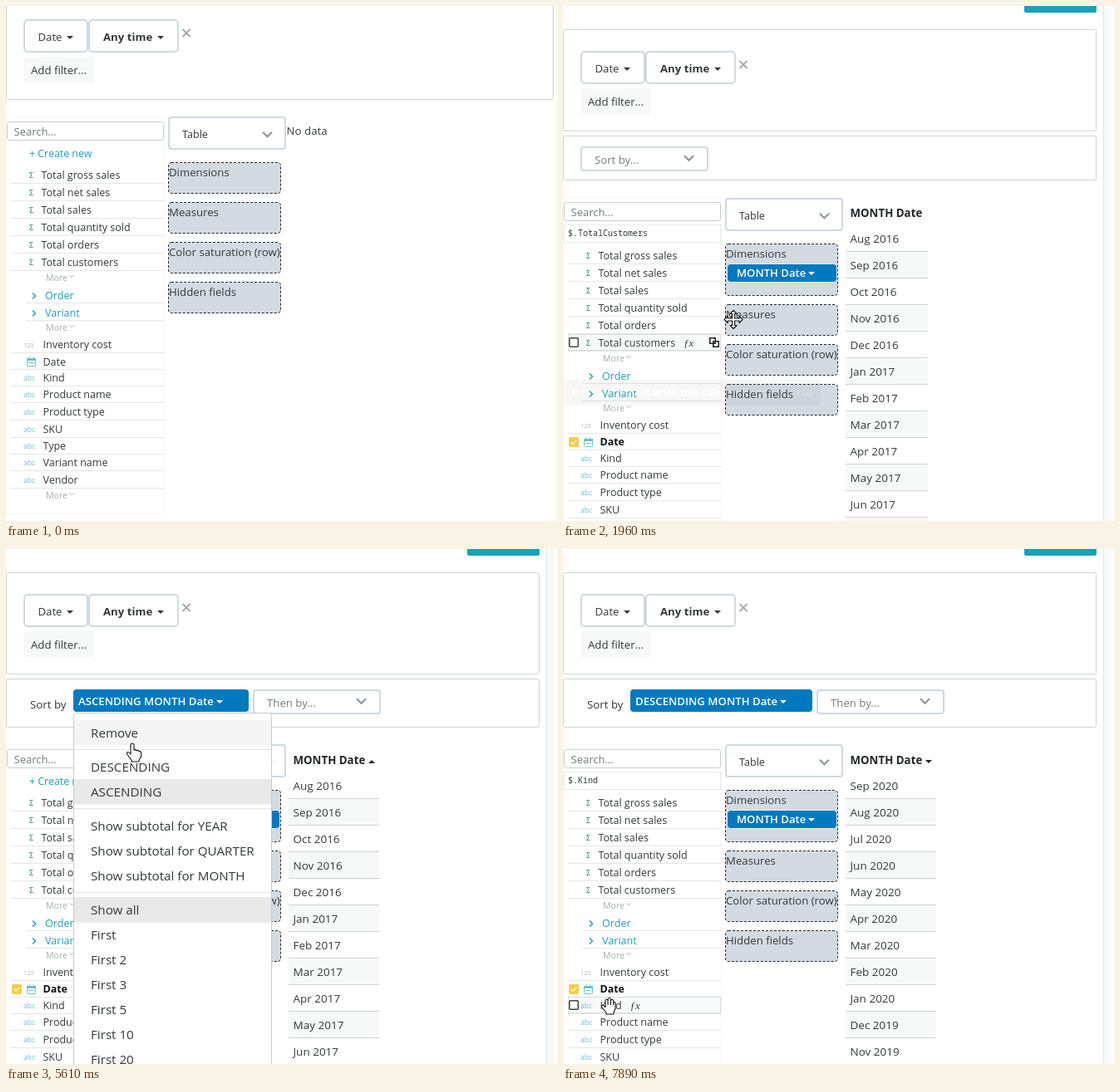
These frames come from a looping animation (663x620 px, 8 s). An HTML page:

```html
<!DOCTYPE html>
<html lang="en">
<head>
<meta charset="utf-8">
<title>Report builder</title>
<style>
html, body { margin: 0; width: 100%; height: 100%; overflow: hidden; background: #fff; }
svg { display: block; font-family: "Open Sans", "Noto Sans", sans-serif; }
.raised { filter: drop-shadow(0 2px 3px rgba(0, 0, 0, .3)); }
</style>
</head>
<body>
<svg id="stage" width="663" height="620" viewBox="0 0 663 620"></svg>
<script>
const LOOP = 8000;
const INK = '#35393d', TEAL = '#1c9fb5', BLUE = '#0079bf', EDGE = '#ced9e1', LINE = '#d0d2d4';
const MONTHS = 'Jan Feb Mar Apr May Jun Jul Aug Sep Oct Nov Dec'.split(' ');
const MEASURES = ['gross sales', 'net sales', 'sales', 'quantity sold', 'orders', 'customers'].map(s => 'Total ' + s);
const FIELDS = [['Inventory cost', 407], ['Date', 428], ['Kind', 447], ['Product name', 467], ['Product type', 488],
  ['SKU', 509], ['Type', 529], ['Variant name', 549], ['Vendor', 570]];
const MENU = [['Remove', 222], ['DESCENDING', 263], ['ASCENDING', 293], ['Show subtotal for YEAR', 334],
  ['Show subtotal for QUARTER', 364], ['Show subtotal for MONTH', 394], ['Show all', 435],
  ...['', ' 2', ' 3', ' 5', ' 10', ' 20'].map((n, i) => ['First' + n, 465 + 30 * i])];

// Moments when the interface changes state
const ADD = 970, LOAD = 1500, OPEN = 2900, SORT = 4270, SORTED = 4540, BLUR = 5000,
  MENU_ON = 5270, MENU_OFF = 7260, RESORTED = 7600;
const HOVER = [[0, ''], [440, 'Date'], [1880, 'Total customers'], [2080, ''], [7260, 'Product name'], [7640, 'Kind']];

// time, x, y, cursor shape from then on
const TRACK = [
  [40, 505, 604, 'arrow'], [400, 110, 440, 'grab'], [500, 42, 421, 'grab'], [640, 42, 421, 'grab'],
  [660, 42, 422, 'grab'], [810, 42, 422, 'grab'], [820, 45, 424, 'grab'], [1840, 45, 424, 'grab'],
  [1960, 205, 378, 'move'], [2060, 215, 330, 'arrow'], [2380, 120, 104, 'arrow'], [2630, 130, 146, 'arrow'],
  [2820, 150, 182, 'arrow'], [2960, 150, 182, 'arrow'], [3270, 85, 208, 'arrow'], [3530, 85, 208, 'arrow'],
  [3610, 74, 198, 'arrow'], [3760, 74, 202, 'arrow'], [4080, 77, 212, 'arrow'], [4530, 77, 212, 'arrow'],
  [4760, 126, 188, 'point'], [4900, 126, 188, 'point'], [5090, 150, 189, 'point'], [5270, 150, 189, 'point'],
  [5590, 152, 234, 'point'], [5700, 152, 234, 'point'], [6050, 164, 256, 'point'], [6200, 164, 256, 'point'],
  [6980, 80, 538, 'grab'], [7200, 57, 565, 'grab'], [7540, 57, 565, 'grab'], [7750, 55, 550, 'grab']];

const SHAPES = {
  arrow: 'M0 0V16.5L4 12.8 6.6 18.8 9.2 17.6 6.6 11.8H12Z',
  point: 'M-2 2a2 2 0 0 1 4 0V8q2-1 3 .8q2-1 3 .8q2.6-.6 2.6 2V16L8 20v2H-1V20L-6 13.5q-1.5-2.5 .2-3Q-4.5 10-2 13Z',
  grab: 'M-4-1V-6q0-2 1.5-2t1.5 2V-7.5q0-2 1.7-2t1.7 2V-6q.3-1.7 1.6-1.7t1.6 2V-4q2.2-1.5 2.4 1V3L6 8V10H-3V8L-8 2q-1.5-2.5 .5-2.8Q-6.5-1-4 1.5ZM-1-6V-1M2.4-6V-1M5.6-5V-1',
  move: 'M0-11l4 4H1.5V-1.5H7V-4l4 4-4 4V1.5H1.5V7H4L0 11-4 7H-1.5V1.5H-7V4l-4-4 4-4V-1.5H-1.5V-7H-4Z'
};

const clamp = v => Math.max(0, Math.min(1, v));
const latest = (list, t) => list.filter(k => k[0] <= t).pop();
// y is the middle of the capitals; the baseline snaps to a whole pixel
const text = (x, y, s, size = 13.2, fill = INK, more = '') =>
  `<text x="${x}" y="${Math.round(y + size * .36)}" font-size="${size}" fill="${fill}" ${more}>${s}</text>`;
const bold = (x, y, s, size, fill, weight = 700) => text(x, y, s, size, fill, `font-weight="${weight}"`);
const fill = (x, y, w, h, color, r = 0) => `<rect x="${x}" y="${y}" width="${w}" height="${h}" rx="${r}" fill="${color}"/>`;
const box = (x, y, w, h, stroke = LINE, sw = 1, r = 2, back = '#fff', more = '') =>
  `<rect x="${x + sw / 2}" y="${y + sw / 2}" width="${w - sw}" height="${h - sw}" rx="${r}" fill="${back}" stroke="${stroke}" stroke-width="${sw}" ${more}/>`;
const rule = (x, y, w, color = '#e4e6e8') => fill(x, y, w, 1, color);
const path = (d, stroke, sw = 1, back = 'none') => `<path d="${d}" fill="${back}" stroke="${stroke}" stroke-width="${sw}"/>`;
const caret = (x, y, color = INK, dir = 1) => path(`M${x} ${y - 2 * dir}h8l-4 ${4 * dir}z`, 'none', 0, color);
const chevron = (x, y, w = 11, color = '#8a949d', sw = 2) => path(`M${x} ${y - w / 4}l${w / 2} ${w / 2} ${w / 2} ${-w / 2}`, color, sw);
const more = y => text(48, y, 'More', 10.6, '#a8adb1') + chevron(76.5, y - 1.5, 5, '#a8adb1', 1);

function select(x, y, w, h, label, size, focused) {
  const main = label === 'Table';
  return box(x, y, w, h, focused ? '#000' : EDGE, 2, 3) +
    text(x + 17, y + h / 2 + 1, label, size, main ? INK : '#757a7f') +
    chevron(x + w - (main ? 28 : 29), y + h / 2 + (main ? 1.5 : -1));
}

function filters(s, width) {
  return fill(555, s - 60, 87, 30, '#17a2b8', 2) +
    box(0, s - 10, width, 123) +
    box(21, s + 16, 78, 40, EDGE, 2, 4) + text(38.5, s + 37, 'Date') + caret(73, s + 38) +
    box(99, s + 16, 109, 40, EDGE, 2, 4) + bold(117, s + 37, 'Any time', 13.2) + caret(182, s + 38) +
    path(`M212.5 ${s + 28}l9 9m0-9l-9 9`, '#a6a9ac', 1.8) +
    fill(21, s + 61, 85, 31, '#f7f8f8', 2) + text(30, s + 77, 'Add filter...');
}

function sorting(t, s, width) {
  const y = s + 118, sorted = t >= SORT;
  let out = box(0, y, width, sorted ? 59 : 54);
  if (!sorted) return out + select(21, y + 13, 154, 30, 'Sort by...', 13.2, t >= OPEN);
  const down = t >= MENU_OFF, w = down ? 219 : 211;
  return out + text(29, y + 31, 'Sort by', 13.3) + fill(81, y + 13, w, 27, BLUE, 4) +
    bold(87, y + 27, (down ? 'DESCENDING' : 'ASCENDING') + ' MONTH Date', 13.2, '#fff', 600) +
    caret(81 + w - 39, y + 28, '#fff') +
    select(81 + w + 5, y + 13, 154, 30, 'Then by...', 13.2, t < BLUR);
}

function field(label, y, on, hovered, measure) {
  const top = Math.floor(y);
  let out = '';
  if (hovered) out += box(6, top - 10, 184, 20, '#d9dcdf', 1, 0, '#f8f9fa');
  if (on || hovered) out += box(7, top - 6, 12, 12, hovered ? (on ? '#8d7a35' : '#444') : '#f3cd4b', hovered ? 1.5 : 1, 1, on ? '#f3cd4b' : '#fff');
  if (on && !hovered) out += path(`M9.5 ${y}l2.5 2.5 4.5-5`, '#fdf3cf', 1.4);
  if (hovered && measure) out += box(176, top - 6, 8, 8, '#222', 1.5, 0) + box(180, top - 2, 8, 8, '#222', 1.5, 0, 'none');
  const fx = hovered ? '<tspan dx="10" font-family="Liberation Serif, serif" font-style="italic" font-weight="400">ƒx</tspan>' : '';
  const x = measure ? 42.5 : 44.5;
  return out + (on ? bold(x, y, label + fx, 12.4, '#111') : text(x, y, label + fx, 12.5));
}

function calendar(y) {
  const color = '#6cc0ce';
  return box(25, y - 4, 11, 10, color, 1, 1) + fill(25, y - 4, 11, 3, color) +
    path(`M28 ${y - 6}v3m5-3v3M27 ${y + 1.5}h7`, color, 1);
}

function fields(t, o, hover) {
  let out = box(0, o + 133, 191, 479, '#f5f5f6') + box(1, o + 139, 189, 23, '#c9cdd1', 1, 3) + text(9.5, o + 151, 'Search...', 13, '#757a7f');
  if (hover) {
    const name = hover.replace(/ (.)/g, (_, c) => c.toUpperCase());
    out += box(1, o + 166, 189, 22, '#d5d8da', 1, 0, '#fff', 'stroke-dasharray="1 1"') +
      text(6, o + 176, '$.' + name, 10, INK, 'font-family="Noto Sans Mono, monospace"');
  } else out += text(28, o + 178, '+ Create new', 12.4, TEAL);

  MEASURES.forEach((m, i) => {
    const y = o + 203.5 + 21 * i;
    out += rule(6, y + 9.5, 184) + field(m, y, false, m === hover, true) + bold(28, y + .5, 'Σ', 8.5, '#3a9683', 600);
  });
  out += more(o + 327) + more(o + 387) + more(o + 589);
  ['Order', 'Variant'].forEach((g, i) => {
    const y = o + 348.5 + 21 * i;
    out += path(`M32 ${y - 3}l3.5 3.5-3.5 3.5`, TEAL, 1.4) + text(47, y, g, 12.6, TEAL) + rule(24, y + 8.5, 166);
  });
  FIELDS.forEach(([f, y0], i) => {
    const y = o + y0, next = FIELDS[i + 1] ? FIELDS[i + 1][1] : y0 + 20;
    out += rule(6, o + Math.floor((y0 + next) / 2), 184) + field(f, y, f === 'Date' && t >= ADD, f === hover);
    out += i === 1 ? calendar(y) : i ? text(21, y + 1, 'abc', 8.6, '#72c0ce') : text(21.5, y + 2, '123', 6.8, '#a3b4be');
  });
  return out;
}

function shelves(t, o) {
  const added = t >= ADD, grow = added ? 25 : 0;
  if (added && t < SORT) o++;
  let out = select(195, o + 133, 142, 40, 'Table', 12.6);
  ['Dimensions', 'Measures', 'Color saturation (row)', 'Hidden fields'].forEach((s, i) => {
    const y = o + 188 + 48 * i + (i ? grow : 0);
    out += box(195, y, 136, 38 + (i ? 0 : grow), '#24282c', 1, 3.5, '#d3dae2', 'stroke-dasharray="3 2"') + text(196, y + 12.5, s, 13.2);
    if (added && !i) out += box(197, y + 24, 133, 23, '#e8edf1', 1, 4, BLUE) +
      bold(209, y + 35.5, 'MONTH Date', 13.1, '#fff', 600) + caret(295, y + 36, '#fff');
  });
  return out;
}

function results(t, o) {
  if (t < LOAD) return text(337.5, o + 150, 'No data', 13.3);
  const w = t < SORTED ? 99 : 109, down = t >= RESORTED;
  let out = bold(345.5, o + 152, 'MONTH Date', 13.3, '#24282c');
  if (t >= SORTED) out += caret(436, o + 154, '#24282c', down ? 1 : -1);
  for (let i = 0; i < 12; i++) {
    const y = o + 183 + 32 * i, month = down ? 2020 * 12 + 8 - i : 2016 * 12 + 7 + i;
    if (i % 2) out += fill(340, y - 17, w, 32, '#f7f8f8');
    if (i) out += rule(340, y - 17, w, LINE);
    out += text(345.5, y, MONTHS[month % 12] + ' ' + Math.floor(month / 12), 13.5);
  }
  return out;
}

function menu(t) {
  const active = t < 5420 ? '' : t < 5850 ? 'Remove' : 'DESCENDING';
  let out = box(81, 197, 239, 440, '#c8cacc', 1, 3);
  for (const y of [241, 312, 413]) out += rule(82, y, 237, '#e2e4e6');
  for (const [label, y] of MENU) {
    const chosen = label === 'ASCENDING' || label === 'Show all';
    if (chosen || label === active) out += fill(82, y - 16, 237, 30.5, chosen ? '#e9e9e9' : '#f4f4f4');
    out += text(102, y, label, 15.2);
  }
  return out;
}

function tooltip(t) {
  const shown = Math.min(clamp((t - ADD) / 150), clamp((1968 - t) / 150));
  return shown ? `<g opacity="${shown}">` + fill(3, 450, 307, 31, '#666', 4) +
    text(11, 465.5, 'Date and time of when this sale or refund occurred', 12, '#fff',
      'font-family="Liberation Sans, Arial, sans-serif" font-weight="700"') + '</g>' : '';
}

function cursor(t) {
  const from = latest(TRACK, t);
  if (!from) return '';
  const to = TRACK[TRACK.indexOf(from) + 1] || from;
  const k = clamp((t - from[0]) / (to[0] - from[0] || 1));
  const at = i => (from[i] + (to[i] - from[i]) * k).toFixed(1);
  return `<g transform="translate(${at(1)} ${at(2)})" stroke-linejoin="round">${path(SHAPES[from[3]], '#111', 1.1, '#fff')}</g>`;
}

function scene(t) {
  const s = t < LOAD ? 0 : 38;
  const o = t < ADD ? 0 : t < LOAD ? 59 : t < SORT ? 97 : 102;
  const width = t < ADD ? 659 : 642;
  let out = filters(s, width);
  if (t >= ADD) out += fill(650, 0, 10, 620, '#f9fafa') + fill(650, 0, 1, 620, '#e2e4e6') + sorting(t, s, width);
  out += fields(t, o, latest(HOVER, t)[1]) + shelves(t, o) + results(t, o);
  if (t >= OPEN && t < SORT) out += box(21, 199, 154, 34, '#777', 1, 0, '#fff', 'class="raised"') + text(38, 217, 'MONTH Date', 13.6, '#111');
  if (t >= MENU_ON && t < MENU_OFF) out += menu(t);
  return out + tooltip(t) + cursor(t);
}

const stage = document.getElementById('stage');
const start = performance.now();
let last = '';
function draw() {
  const next = scene((performance.now() - start) % LOOP);
  if (next !== last) stage.innerHTML = last = next;
  requestAnimationFrame(draw);
}
draw();
</script>
</body>
</html>
```
